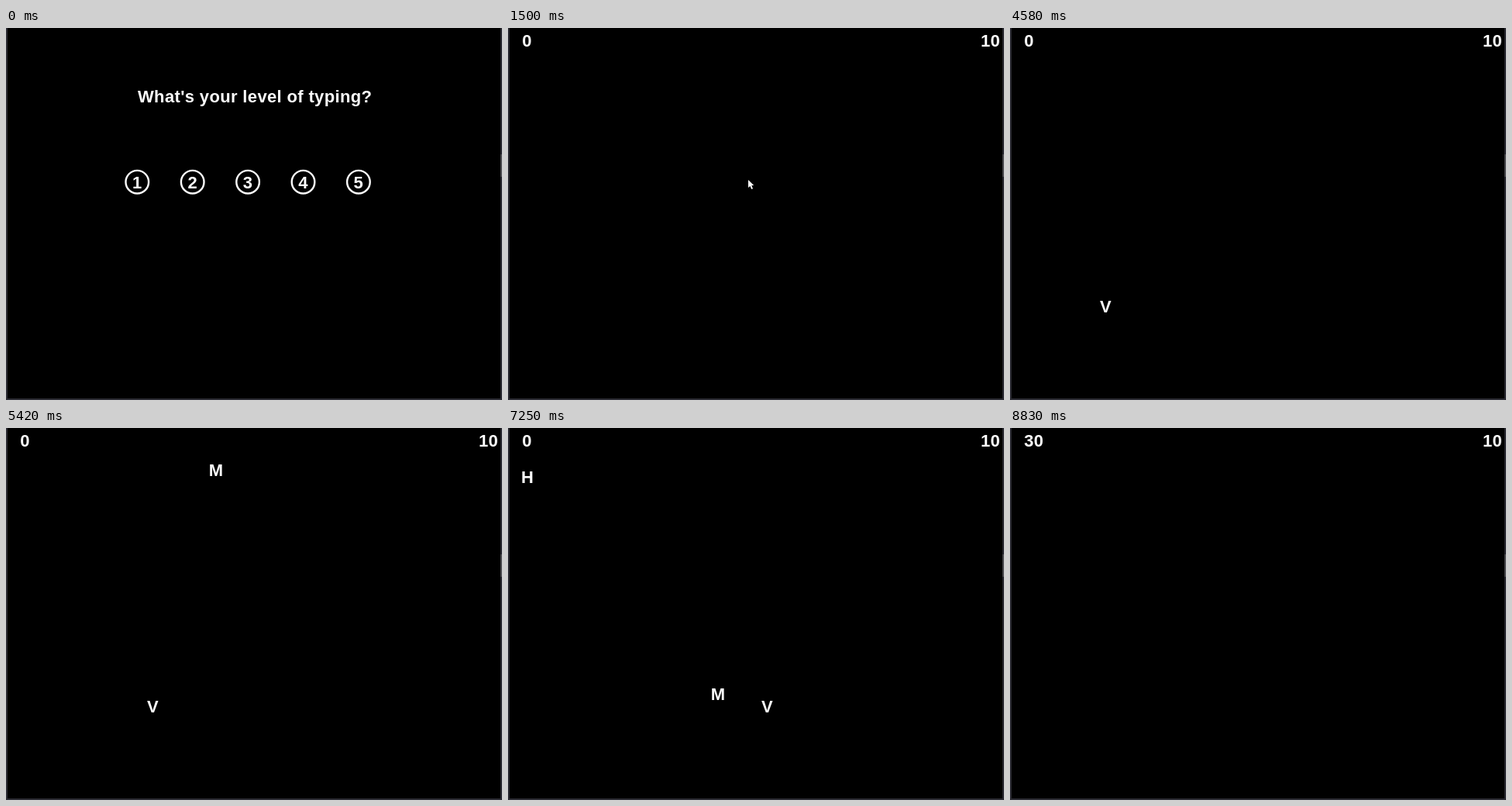
An HTML page with a canvas for the animation above (8910 ms loop, 640x480 px).

```html
<!DOCTYPE html>
<html lang="en">
<head>
<meta charset="utf-8">
<title>Typing game</title>
<style>
  html, body { margin: 0; width: 100%; height: 100%; overflow: hidden; background: #000; }
  canvas { display: block; }
</style>
</head>
<body>
<canvas id="stage" width="640" height="480"></canvas>
<script>
const ctx = document.getElementById("stage").getContext("2d");
const LOOP = 8910, FPS = 12, GAME_START = 14;
const INK = "#fcfcfc";
const SPEED = 13.15;

// Each letter lives from tick "born" until it is typed at tick "gone".
const letters = [
  { char: "V", born: 38, gone: 106, x: 11.5, y: 359, vx: 6.59, vy: 0 },
  { char: "M", born: 62, gone: 95, x: 271, y: 14.2, vx: 0, vy: SPEED },
  { char: "H", born: 86, gone: 101, x: 12, y: 50, vx: SPEED, vy: SPEED }
];

function label(text, x, baseline, align = "left") {
  ctx.textAlign = align;
  ctx.fillText(text, x, baseline);
}

function drawFrame() {
  ctx.fillStyle = "#000";
  ctx.fillRect(0, 0, 640, 480);
  ctx.fillStyle = "#2c2c34";
  ctx.fillRect(0, 0, 2, 480);
  ctx.fillRect(638, 0, 2, 480);
  ctx.fillRect(0, 478, 640, 2);
  ctx.fillStyle = "#505054";
  ctx.fillRect(638, 163, 2, 29);
}

function drawMenu() {
  label("What's your level of typing?", 170, 96);
  for (let i = 0; i < 5; i++) {
    const x = 169.3 + i * 71.4;
    ctx.beginPath();
    ctx.arc(x, 198.7, 14.8, 0, Math.PI * 2);
    ctx.stroke();
    label(i + 1, x, 207, "center");
  }
}

function drawGame(tick) {
  const typed = letters.filter(l => tick >= l.gone).length;
  label(typed * 10, 18.2, 24);
  label("10", 610, 24);
  for (const l of letters) {
    if (tick < l.born || tick >= l.gone) continue;
    const age = tick - l.born;
    label(l.char, l.x + l.vx * age, l.y + l.vy * age + 8, "center");
  }
}

function cursorAt(tick) {
  if (tick < 3 || tick >= 25) return null;
  if (tick < GAME_START) {
    const rest = (1 - (tick - 3) / 10) ** 2;
    return [312 + 120 * rest, 208 + 270 * rest];
  }
  const p = Math.max(0, (tick - 18) / 7);
  return [310 + 330 * p, 196 - 270 * p + 515 * p * p];
}

function drawCursor(x, y) {
  const outline = [[0, 0], [0, 10], [2.4, 8], [4.2, 12], [6, 11.2], [4.3, 7.2], [7.2, 7]];
  ctx.beginPath();
  for (const [dx, dy] of outline) ctx.lineTo(x + dx, y + dy);
  ctx.closePath();
  ctx.fill();
}

function draw(time) {
  const tick = Math.floor((time % LOOP + 4) * FPS / 1000);
  drawFrame();
  ctx.fillStyle = ctx.strokeStyle = INK;
  ctx.lineWidth = 2.4;
  ctx.font = "bold 22px 'Liberation Sans', Arial, sans-serif";
  ctx.letterSpacing = "0.35px";
  if (tick < GAME_START) drawMenu();
  else drawGame(tick);
  const cursor = cursorAt(tick);
  if (cursor) drawCursor(...cursor);
}

const start = performance.now();
function loop() {
  draw(performance.now() - start);
  requestAnimationFrame(loop);
}
loop();
</script>
</body>
</html>
```
